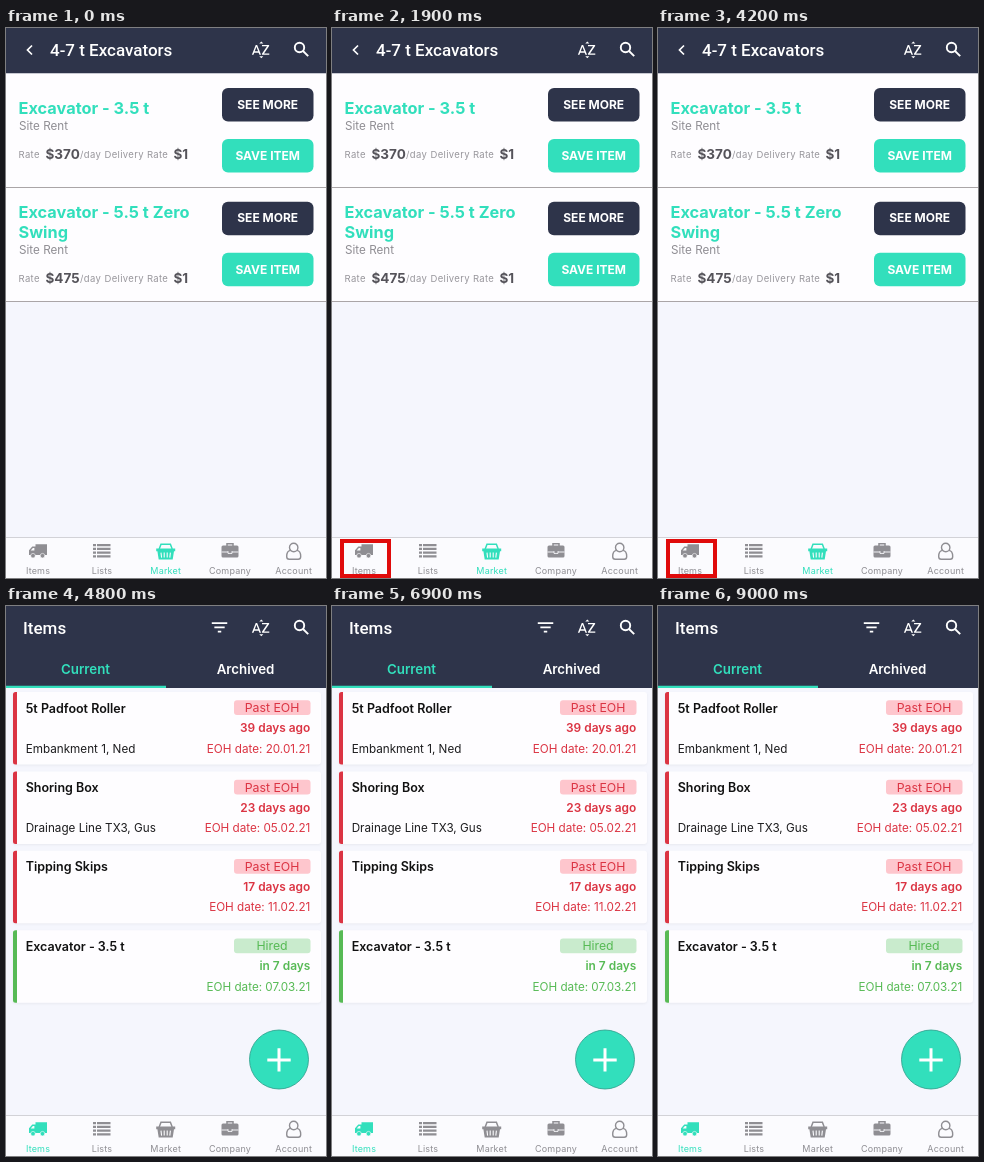
An HTML page for the animation above (9.1 s loop, 320 by 550 pixels).

```html
<!DOCTYPE html>
<html lang="en">
<head>
<meta charset="utf-8">
<title>Plant hire app</title>
<style>
  :root { --navy: #2e344a; --teal: #32dfbc; --grey: #8f8e93; --red: #db3443; --green: #57ba55; }
  html, body { margin: 0; width: 100%; height: 100%; overflow: hidden; background: #f5f6fd; }
  svg { display: block; }
  .stage { width: 100vw; height: 100vh; }
  text { font-family: Inter, "Open Sans", sans-serif; font-size: 11.7px; }

  .title { font: 500 17px Roboto, sans-serif; fill: #fff; }
  .tool { fill: #fff; }
  .head { fill: var(--navy); }
  .segment { font-size: 13.3px; font-weight: 600; text-anchor: middle; fill: #fff; }
  .segment.on, .accent { fill: var(--teal); }

  .name { font-size: 16.35px; font-weight: 700; fill: var(--teal); }
  .owner { fill: #8f8d93; }
  .label { font-size: 9.5px; letter-spacing: .33px; fill: #98969c; }
  .price { font-size: 13.5px; font-weight: 700; fill: #55535a; }
  .button { font-size: 12px; font-weight: 700; text-anchor: middle; fill: #fff; }

  .job { font-size: 12.5px; font-weight: 600; fill: #111; }
  .place { fill: #1c1c1e; }
  .state { font-size: 12.3px; text-anchor: middle; }
  .due, .date { text-anchor: end; }
  .due { font-size: 11.9px; font-weight: 600; }
  .late { fill: var(--red); --pill: #fec6cd; }
  .hired { fill: var(--green); --pill: #c9ebcd; }
  .pill { fill: var(--pill); }
  .card { fill: #fefdff; filter: drop-shadow(0 1px 1px #0000000d); }

  .tabs text { font-size: 9px; letter-spacing: .18px; text-anchor: middle; }
  .tabs g { fill: var(--grey); color: var(--grey); }
  .tabs .on { fill: var(--teal); color: var(--teal); }

  .market { animation: market 9.1s step-end infinite; }
  .items { animation: items 9.1s step-end infinite; }
  .mark { fill: none; stroke: #e00b0b; stroke-width: 4; animation: mark 9.1s step-end infinite; }
  @keyframes market { 0% { visibility: visible } 50.549%, 100% { visibility: hidden } }
  @keyframes items { 0% { visibility: hidden } 50.549%, 100% { visibility: visible } }
  @keyframes mark { 0% { opacity: 0 } 10.989% { opacity: 1 } 49.451%, 100% { opacity: 0 } }
</style>
</head>
<body>
<svg class="stage" viewBox="0 0 320 550">
  <defs>
    <g id="tools" class="tool">
      <path transform="translate(244.5 11.5) scale(.86)" d="M14.94 4.66h-4.72l2.36-2.36zm-4.69 14.71h4.66l-2.33 2.33zM6.1 6.27 1.6 17.73h1.84l.92-2.45h5.11l.92 2.45h1.84L7.74 6.27zm-1.13 7.37 1.94-5.18 1.94 5.18zm10.76 2.5h6.12v1.59h-8.53v-1.29l5.92-8.56h-5.88v-1.6h8.3v1.26z"/>
      <g fill="none" stroke="#fff" stroke-width="1.9">
        <circle cx="293.5" cy="19.5" r="4.7"/>
        <path d="m297 23 5.2 5.2"/>
      </g>
    </g>

    <!-- Tab icons, centred on x = 0 -->
    <g id="truck">
      <path d="M-2.5 516.3H9V527H-2.5zM-9 527v-4.8l3.3-3.7h3.7V527z"/>
      <path d="M-7.3 522.6l2.2-2.5h1.5v2.5z" fill="#fbfbfe"/>
      <circle cx="-5" cy="527.7" r="2.3" stroke="#fbfbfe" stroke-width=".6"/>
      <circle cx="4.5" cy="527.7" r="2.3" stroke="#fbfbfe" stroke-width=".6"/>
    </g>
    <path id="list" d="M-9 517.2h3m1 0H8.5M-9 520.9h3m1 0H8.5M-9 524.6h3m1 0H8.5M-9 528.3h3m1 0H8.5" stroke="currentColor" stroke-width="2.3"/>
    <g id="basket">
      <path d="M-9.5 520.6H9.5v2.6h-1.2L7 531.5H-7l-1.3-8.3h-1.2z"/>
      <path d="M-6.5 521l1.8-4.8h9.4l1.8 4.8" fill="none" stroke="currentColor" stroke-width="1.5"/>
      <path d="M-4.7 524.6l.6 5M-1.5 524.6v5M1.5 524.6v5M4.7 524.6l-.6 5" stroke="#fbfbfe" stroke-width="1.1"/>
    </g>
    <g id="case">
      <rect x="-8.5" y="517.5" width="17" height="12" rx="1.5"/>
      <path d="M-3 518v-2.2h6v2.2" fill="none" stroke="currentColor" stroke-width="1.5"/>
      <path d="M-8.5 524h6.5m4 0h6.5M-2 523.2v2.2h4v-2.2" fill="none" stroke="#fbfbfe" stroke-width=".9"/>
    </g>
    <g id="person" fill="none" stroke="currentColor" stroke-width="1.4">
      <circle cy="519.5" r="4.2"/>
      <path d="M-3.3 522.4c-2.8.4-3.7 3-3.7 6 0 1.800 1 2.800 2.500 2.800h9c1.500 0 2.500-1 2.500-2.800 0-3-.9-5.600-3.700-6"/>
    </g>

    <g id="buttons">
      <rect class="head" x="216" y="60" width="91.5" height="33.5" rx="6"/>
      <rect class="accent" x="216" y="111" width="91.5" height="33.5" rx="6"/>
      <text class="button" x="261.7" y="80.8">SEE MORE</text>
      <text class="button" x="261.7" y="132.3">SAVE ITEM</text>
    </g>
    <g id="rates">
      <text class="label" x="12.5" y="129.5">Rate</text>
      <text class="label" x="74" y="129.5">/day</text>
      <text class="label" x="98.5" y="129.5">Delivery Rate</text>
      <text class="price" x="167.5" y="130.5">$1</text>
    </g>
    <g id="card">
      <rect class="card" x="7" y="86" width="308" height="72.5" rx="3"/>
      <path d="M11 86v72.5H9.5a2.5 2.5 0 0 1-2.5-2.5V88.5A2.5 2.5 0 0 1 9.5 86z"/>
      <rect class="pill" x="228" y="94.3" width="76.5" height="14.7" rx="3"/>
    </g>
    <g id="bar">
      <path d="M0 509h320v41H0z" fill="#fbfbfe"/>
      <path d="M0 509.5h320" stroke="#d2d2d7"/>
    </g>
  </defs>

  <path d="M0 0h320v550H0z" fill="#f5f6fd"/>

  <g class="market">
    <path class="head" d="M0 0h320v45.500H0z"/>
    <path d="m26 17.5-4.5 4.5 4.5 4.5" fill="none" stroke="#fff" stroke-width="1.7"/>
    <text class="title" x="44" y="28">4-7 t Excavators</text>
    <use href="#tools"/>

    <path d="M0 45.5h320V273H0z" fill="#fefdff"/>
    <path d="M0 159.5h320M0 273.5h320" stroke="#aaa5a7"/>

    <text class="name" x="12.5" y="86">Excavator - 3.5 t</text>
    <text class="owner" x="13" y="102">Site Rent</text>
    <text class="price" x="39.5" y="130.5">$370</text>
    <use href="#rates"/>
    <use href="#buttons"/>

    <text class="name" x="12.5" y="190">Excavator - 5.5 t Zero</text>
    <text class="name" x="12.5" y="210">Swing</text>
    <text class="owner" x="13" y="226">Site Rent</text>
    <text class="price" x="39.5" y="254.5">$475</text>
    <use href="#rates" y="124"/>
    <use href="#buttons" y="113.7"/>
  </g>

  <g class="items">
    <path class="head" d="M0 0h320v82H0z"/>
    <text class="title" x="17" y="28">Items</text>
    <path class="tool" transform="translate(203.2 11) scale(.86)" d="M10 18h4v-2h-4zM3 6v2h18V6zm3 7h12v-2H6z"/>
    <use href="#tools"/>
    <text class="segment on" x="79.5" y="67.5">Current</text>
    <text class="segment" x="239.5" y="67.5">Archived</text>
    <path class="accent" d="M0 79.7h160V82H0z"/>

    <g class="late">
      <use href="#card"/>
      <text class="job" x="19.7" y="106.5">5t Padfoot Roller</text>
      <text class="place" x="19.7" y="146.5">Embankment 1, Ned</text>
      <text class="state" x="266" y="106.3">Past EOH</text>
      <text class="due" x="304.3" y="126.3">39 days ago</text>
      <text class="date" x="304.3" y="146.5">EOH date: 20.01.21</text>
    </g>
    <g class="late" transform="translate(0 79.4)">
      <use href="#card"/>
      <text class="job" x="19.7" y="106.5">Shoring Box</text>
      <text class="place" x="19.7" y="146.5">Drainage Line TX3, Gus</text>
      <text class="state" x="266" y="106.3">Past EOH</text>
      <text class="due" x="304.3" y="126.3">23 days ago</text>
      <text class="date" x="304.3" y="146.5">EOH date: 05.02.21</text>
    </g>
    <g class="late" transform="translate(0 158.8)">
      <use href="#card"/>
      <text class="job" x="19.7" y="106.5">Tipping Skips</text>
      <text class="state" x="266" y="106.3">Past EOH</text>
      <text class="due" x="304.3" y="126.3">17 days ago</text>
      <text class="date" x="304.3" y="146.5">EOH date: 11.02.21</text>
    </g>
    <g class="hired" transform="translate(0 238.2)">
      <use href="#card"/>
      <text class="job" x="19.7" y="106.5">Excavator - 3.5 t</text>
      <text class="state" x="266" y="106.3">Hired</text>
      <text class="due" x="304.3" y="126.3">in 7 days</text>
      <text class="date" x="304.3" y="146.5">EOH date: 07.03.21</text>
    </g>

    <circle class="accent" cx="273" cy="453.5" r="29.5" stroke="#2a9c88" stroke-width=".8"/>
    <path d="M261.3 453.9h23.400M273 442.2v23.400" stroke="#fff" stroke-width="3"/>
  </g>

  <use href="#bar"/>
  <g class="tabs">
    <g transform="translate(96)"><use href="#list"/><text y="545.5">Lists</text></g>
    <g transform="translate(224)"><use href="#case"/><text y="545.5">Company</text></g>
    <g transform="translate(287.7)"><use href="#person"/><text y="545.5">Account</text></g>
    <g class="market">
      <g transform="translate(32)"><use href="#truck"/><text y="545.5">Items</text></g>
      <g class="on" transform="translate(159.7)"><use href="#basket"/><text y="545.5">Market</text></g>
    </g>
    <g class="items">
      <g class="on" transform="translate(32)"><use href="#truck"/><text y="545.5">Items</text></g>
      <g transform="translate(159.7)"><use href="#basket"/><text y="545.5">Market</text></g>
    </g>
  </g>
  <rect class="mark" x="10" y="513" width="47" height="35"/>
</svg>
</body>
</html>
```
